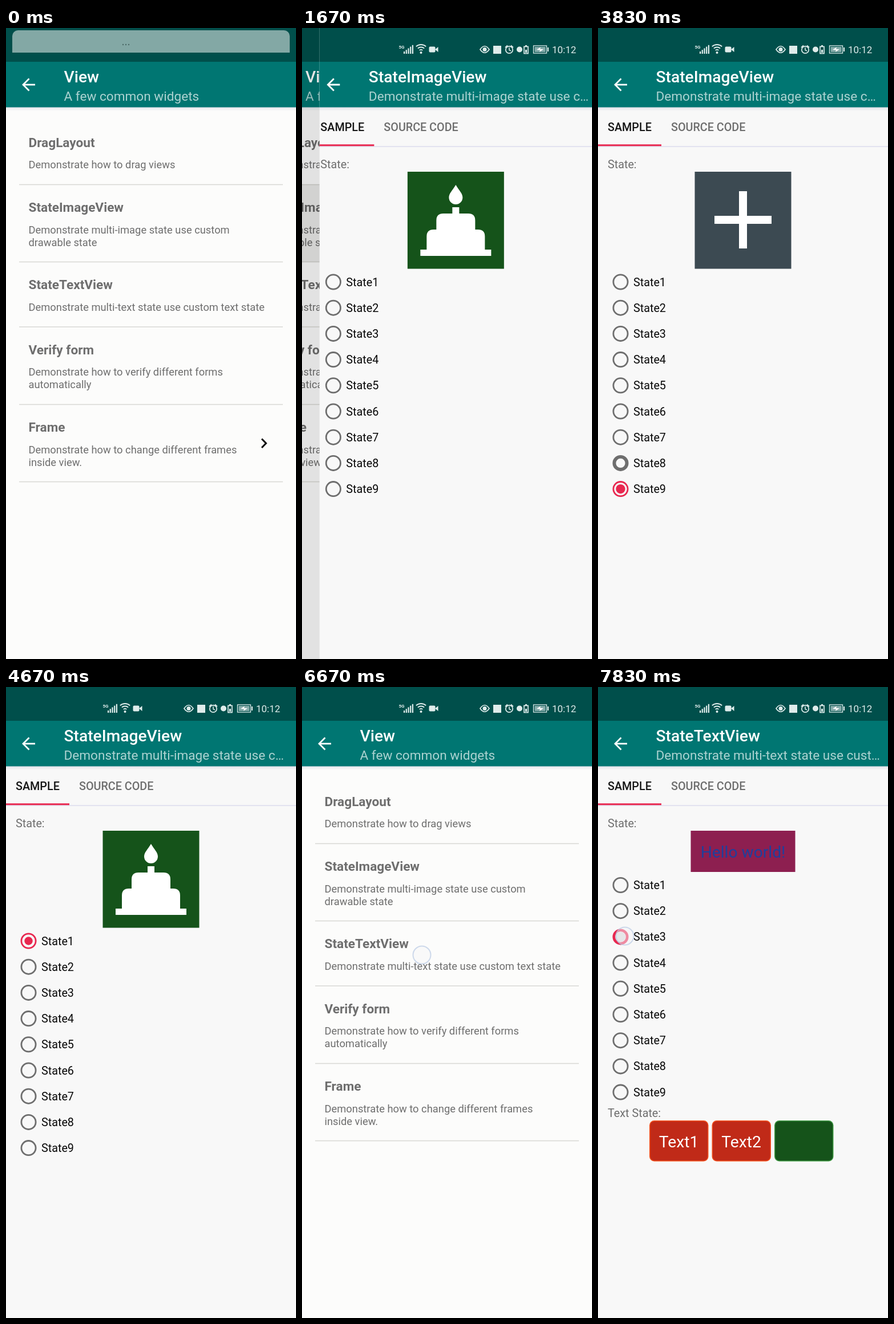
Animation, 508 px wide and 1102 px high, one loop 8000 ms. Source, as an HTML page with a canvas:

```html
<!DOCTYPE html>
<html lang="en">
<head>
<meta charset="utf-8">
<style>
  html, body { margin: 0; width: 508px; height: 1102px; overflow: hidden; background: #fcfcfb; }
  canvas { display: block; }
</style>
</head>
<body>
<canvas id="stage" width="508" height="1102"></canvas>
<script>
const c = document.getElementById('stage').getContext('2d');
const W = 508, H = 1102, LOOP = 8000, SLIDE = 400, CHECK = 500;
const TEAL = '#007672', DARK = '#004f4b', GREY = '#6e6e6e', RED = '#e8274f', GREEN = '#15531a';
const clamp = x => Math.max(0, Math.min(1, x));
const easeOut = p => 1 - (1 - clamp(p)) ** 3;

const rows = [
  [160, 'DragLayout', 'Demonstrate how to drag views'],
  [273.5, 'StateImageView', 'Demonstrate multi-image state use custom', 'drawable state'],
  [408.5, 'StateTextView', 'Demonstrate multi-text state use custom text state'],
  [522, 'Verify form', 'Demonstrate how to verify different forms', 'automatically'],
  [657.5, 'Frame', 'Demonstrate how to change different frames', 'inside view.'],
  [792.5]
];
const rowTaps = [[1, 1390], [2, 6840]];

// [state, time] of each radio tap
const imageTaps = [1, 2, 3, 4, 5, 6, 7].map(n => [n, 1990 + n * 140]).concat([[8, 3230], [9, 3400], [1, 4100]]);
const textTaps = [[3, 7790]];
const OPEN_IMAGE = 1428, BACK_TAP = 5960, CLOSE_IMAGE = 5985, OPEN_TEXT = 6893;

// [time, x, y, lead]
const touches = [
  [1390, 210, 345, 180], [6840, 210, 468, 180], [BACK_TAP, 42, 100, 180],
  ...imageTaps.map(([n, at]) => [at, n === 8 ? 62 : 52, 395.5 + n * 45.2, 100]),
  [7790, 47, 435, 110]
];

// Background and white glyph of each image state
const pictures = [
  [GREEN, 'M254 274C260 284 266 289 266 296A12 12 0 0 1 242 296C242 289 248 284 254 274Z' +
    'M248 313H260V324H276Q288 324 288 336V352H293Q305 352 305 364V387H316V398H192V387H203V364' +
    'Q203 352 215 352H220V336Q220 324 232 324H248Z'],
  ['#c02a18', 'M228 288L298 335L228 382Z'],
  ['#8d1f50', 'M254 280L270 318L311 321L280 348L290 388L254 366L218 388L228 348L197 321L238 318Z'],
  ['#e2600f', 'M254 285A50 50 0 0 1 254 385A50 50 0 0 1 254 285Z'],
  ['#4a2a8a', 'M200 298H308V374H200Z'],
  ['#00756f', 'M254 385L206 337C180 300 230 265 254 301C278 265 328 300 302 337Z'],
  ['#06429a', 'M242 293V288A9 9 0 0 1 260 288V293Z' +
    'M203 376V370L215 358V327A36 36 0 0 1 287 327V358L299 370V376Z' +
    'M226 364H277V327A25.5 25.5 0 0 0 226 327ZM240 381H262A11 11 0 0 1 240 381Z'],
  ['#5a3a20', 'M210 291H298V379H210Z'],
  ['#3c4a52', 'M247 285H261V328H304V342H261V385H247V342H204V328H247Z']
].map(([bg, d]) => [bg, new Path2D(d)]);

function text(s, x, y, size, color, weight = 400, align = 'left') {
  c.font = `${weight} ${size}px Roboto, sans-serif`;
  c.textAlign = align;
  c.fillStyle = color;
  c.fillText(s, x, Math.round(y));
}
function rect(x, y, w, h, color, radius = 0) {
  c.fillStyle = color;
  c.beginPath();
  c.roundRect(x, y, w, h, radius);
  c.fill();
}
function disc(x, y, r, color) {
  c.fillStyle = color;
  c.beginPath();
  c.arc(x, y, r, 0, 7);
  c.fill();
}
function arc(x, y, r, color, width, from = 0, to = 7) {
  c.strokeStyle = color;
  c.lineWidth = width;
  c.beginPath();
  c.arc(x, y, r, from, to);
  c.stroke();
}
function line(color, width, ...pts) {
  c.strokeStyle = color;
  c.lineWidth = width;
  c.beginPath();
  for (let i = 0; i < pts.length; i += 2) c.lineTo(pts[i], pts[i + 1]);
  c.stroke();
}

function header(title, sub, dx) {
  rect(0, 0, W, 59, DARK);
  rect(0, 59, W, 79.5, TEAL);
  const g = c.createLinearGradient(0, 138, 0, 145);
  g.addColorStop(0, 'rgba(90,110,150,.16)');
  g.addColorStop(1, 'rgba(90,110,150,0)');
  rect(0, 138, W, 7, g);
  c.translate(dx, 0);
  line('#fff', 2.8, 51, 99, 30, 99);
  line('#fff', 2.8, 40.5, 88.5, 30, 99, 40.5, 109.5);
  text(title, 101.5, 95, 28.2, '#fff', 500);
  text(sub, 101.5, 127, 22.6, 'rgba(255,255,255,.68)');
}

function list(t, shown) {
  c.save();
  rect(0, 0, W, H, '#fcfcfb');
  header('View', 'A few common widgets', -0.2 * W * shown);
  for (const [y, title, ...lines] of rows) {
    if (y > 160) line('#d8d8d4', 1.5, 23, y, 485, y);
    if (!title) continue;
    text(title, 39.5, y + 47.9, 22.6, GREY, 700);
    lines.forEach((s, i) => text(s, 39.5, y + 85.3 + i * 21.7, 18.34, GREY));
  }
  for (const [i, at] of rowTaps) {
    const age = t - at, y = rows[i][0];
    if (age < -60 || age > 330) continue;
    const alpha = .24 * Math.min(clamp((age + 60) / 120), clamp((330 - age) / 170));
    rect(0, y, W, rows[i + 1][0] - y, `rgba(0,0,0,${alpha})`);
  }
  c.restore();
  if (shown) rect(0, 0, W, H, `rgba(0,0,0,${.11 * shown})`);
}

function radios(t, y0, taps) {
  for (let n = 1; n <= 9; n++) {
    const y = y0 + (n - 1) * 45.2;
    let v = 0, color = GREY;
    taps.forEach(([state, at], i) => {
      if (state !== n || t < at) return;
      const next = i + 1 < taps.length ? taps[i + 1][1] : Infinity;
      const age = t - at, on = t < next;
      v = on ? clamp(age / CHECK) : 1 - clamp((t - next) / CHECK);
      color = on ? RED : GREY;
      const alpha = .12 * clamp((400 - age) / 200);
      if (alpha) disc(39.5, y, 26 * clamp((age + 20) / 180), `rgba(0,0,0,${alpha})`);
    });
    const hole = v > .5 ? 11.2 : 11.2 * (1 - 2 * v);
    arc(39.5, y, (14 + hole) / 2, color, 14 - hole);
    if (v > .5) disc(39.5, y, 7.2 + 7 * (1 - v), color);
    text('State' + n, 62, y + 7, 19.76, '#080808');
  }
}

function imageBody(t) {
  const last = imageTaps.filter(tap => t >= tap[1]).pop();
  const [bg, glyph] = pictures[last ? last[0] - 1 : 0];
  rect(169.5, 251, 169, 169.5, bg);
  c.fillStyle = '#fff';
  c.fill(glyph);
  radios(t, 443.5, imageTaps);
  const age = t - BACK_TAP + 150;
  if (age > 0) disc(39.5, 98.5, 27 * clamp(age / 170), 'rgba(255,255,255,.2)');
}

function textBody(t) {
  const tapped = t >= textTaps[0][1];
  rect(162.5, 251, 183, 72, tapped ? '#8d1f50' : GREEN);
  text('Hello world!', 254, 298, 28.2, tapped ? '#1f3f9c' : '#e2600f', 400, 'center');
  radios(t, 346, textTaps);
  text('Text State:', 17, 751, 19.76, GREY);
  for (let i = 0; i < 3; i++) {
    const x = 90 + i * 109.5, green = i === 2;
    rect(x, 757, 103.5, 71.5, green ? '#3f9a43' : '#f4511e', 8.5);
    rect(x + 1.5, 758.5, 100.5, 68.5, green ? GREEN : '#c02a18', 7);
    if (!green || !tapped) text('Text' + (i + 1), x + 51.5, 804, 28.2, green ? '#b02c16' : '#fff', 400, 'center');
  }
}

function page(t, edge, title, sub, body) {
  c.save();
  c.beginPath();
  c.rect(edge, 0, W, H);
  c.clip();
  rect(0, 0, W, H, '#f8f8f8');
  header(title, sub, edge / 2);
  text('SAMPLE', 17, 180, 19.76, '#161616', 500);
  text('SOURCE CODE', 128, 180, 19.76, GREY, 500);
  line('#dcdcee', 1.5, -W, 207, W, 207);
  rect(0, 203.3, 111, 3, RED);
  text('State:', 17, 245, 19.76, GREY);
  body(t);
  c.restore();
}

function statusIcons() {
  const ink = '#dfeceb';
  text('5G', 169.5, 36, 8, ink, 700);
  for (let i = 0; i < 5; i++) rect(178 + i * 3.7, 41 - i * 2.8, 2.2, 4 + i * 2.8, ink);
  for (const r of [4, 8.5, 13]) arc(208.5, 42, r, ink, 1.8, -2.3, -.84);
  disc(208.5, 43, 2, ink);
  rect(222.5, 32.5, 11, 10, ink, 2);
  c.fillStyle = ink;
  c.fill(new Path2D('M233 37.5L238.5 33V42Z'));

  c.lineWidth = 1.7;
  c.strokeStyle = ink;
  c.stroke(new Path2D('M312 37.5Q320 26 328 37.5Q320 49 312 37.5Z'));
  disc(320, 37.5, 3.5, ink);
  rect(335, 31, 14, 14, ink);
  arc(363, 38, 6.2, ink, 1.7);
  line(ink, 1.5, 363, 34, 363, 38.5, 366, 40);
  line(ink, 1.7, 356, 34, 360, 30.5);
  line(ink, 1.7, 366, 30.5, 370, 34);
  disc(381, 37.5, 5, ink);
  c.strokeRect(389, 32.5, 7, 12);
  rect(391, 38, 3, 5, ink);
  rect(391, 30, 3, 2, ink);
  c.lineWidth = 1.3;
  c.strokeRect(405.5, 31, 23, 13);
  rect(407.5, 33, 19, 9, 'rgba(223,236,235,.6)');
  rect(430, 34, 2, 7, ink);
  c.fillStyle = '#fff';
  c.fill(new Path2D('M411 38L418 33.5L417 37L423 37L416 42L417 38.5Z'));
  text('10:12', 438, 44, 17, ink);
}

// Notification bar and edge arrow on their way out
function leftovers(t) {
  const p = clamp((t - 100) / 400);
  if (p === 1) return;
  const y = 4 - 50 * p * p;
  rect(11, y, 486, 39, '#83a8a5', [10, 10, 0, 0]);
  for (const x of [205, 210, 215]) disc(x, y + 25, 1.2, '#4c6a68');
  const q = clamp((t - 100) / 220);
  const x = 448 + 60 * q;
  c.globalAlpha = 1 - q;
  line('#0a0a0a', 3, x, 717.5, x + 7.5, 725.2, x, 733);
  c.globalAlpha = 1;
}

function touch(t) {
  for (const [at, x, y, lead] of touches) {
    const age = t - at;
    if (age < -lead || age > 70) continue;
    c.globalAlpha = clamp((70 - age) / 30) * (y < 138 ? .4 : 1);
    disc(x, y, 16, 'rgba(245,245,248,.5)');
    arc(x, y, 15.5, 'rgba(175,195,225,.6)', 2);
    c.globalAlpha = 1;
  }
}

function draw(t) {
  const onText = t > 6600;
  const edge = onText ? W * (1 - easeOut((t - OPEN_TEXT) / SLIDE))
    : t > CLOSE_IMAGE ? W * easeOut((t - CLOSE_IMAGE) / SLIDE)
    : W * (1 - easeOut((t - OPEN_IMAGE) / SLIDE));
  list(t, 1 - edge / W);
  if (edge < W) {
    if (onText) page(t, edge, 'StateTextView', 'Demonstrate multi-text state use cust…', textBody);
    else page(t, edge, 'StateImageView', 'Demonstrate multi-image state use c…', imageBody);
  }
  c.globalAlpha = clamp((t - 100) / 300);
  statusIcons();
  c.globalAlpha = 1;
  leftovers(t);
  touch(t);
}

const start = performance.now();
function tick(now) {
  draw(Math.max(0, now - start) % LOOP);
  requestAnimationFrame(tick);
}
tick(start);
</script>
</body>
</html>
```
